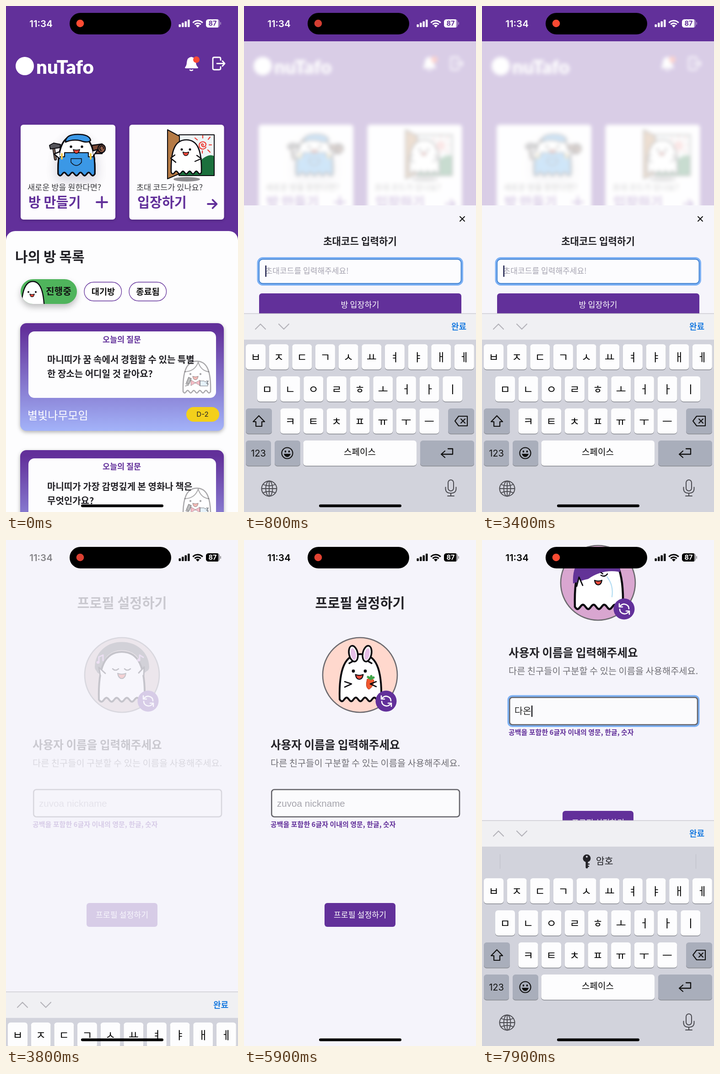
Animation, 507 px wide and 1104 px high, one loop 8000 ms. Source, as an HTML page with a canvas:

```html
<!DOCTYPE html>
<html lang="ko">
<head>
<meta charset="utf-8">
<title>Room app</title>
<style>
html, body { margin: 0; width: 507px; height: 1104px; overflow: hidden; background: #f5f4fb; }
canvas { display: block; width: 507px; height: 1104px; }
</style>
</head>
<body>
<canvas id="stage"></canvas>
<script>
const W = 507, H = 1104, LOOP = 8000;
const PURPLE = '#62309a', PAPER = '#f5f4fb', INK = '#232227', LINE = '#0c0b10';
const KR = '"Noto Sans CJK KR", "Noto Sans CJK", sans-serif';
const UI = 'Inter, sans-serif';

let c;
const stage = document.getElementById('stage');

function makeContext(canvas, scale) {
  canvas.width = W * scale;
  canvas.height = H * scale;
  const ctx = canvas.getContext('2d');
  ctx.scale(scale, scale);
  ctx.lineCap = ctx.lineJoin = 'round';
  return ctx;
}

// ---------- helpers ----------
const clamp = v => Math.max(0, Math.min(1, v));
const lerp = (a, b, k) => a + (b - a) * k;
const ramp = (t, start, dur) => clamp((t - start) / dur);
const easeOut = k => 1 - (1 - k) ** 3;

function paint(p, fill, stroke, w = 2) {
  if (fill) { c.fillStyle = fill; c.fill(p); }
  if (stroke) { c.strokeStyle = stroke; c.lineWidth = w; c.stroke(p); }
}
const path = (d, fill, stroke, w) => paint(new Path2D(d), fill, stroke, w);
function box(x0, y0, x1, y1, r, fill, stroke, w) {
  const p = new Path2D();
  p.roundRect(x0, y0, x1 - x0, y1 - y0, r);
  paint(p, fill, stroke, w);
  return p;
}
function oval(x, y, rx, ry, fill, stroke, w, turn = 0) {
  const p = new Path2D();
  p.ellipse(x, y, rx, ry, turn, 0, 7);
  paint(p, fill, stroke, w);
  return p;
}
function text(s, x, cy, size, color, weight = 400, align = 'left', font = KR) {
  c.font = `${weight} ${size}px ${font}`;
  c.textAlign = align;
  c.fillStyle = color;
  c.fillText(s, x, cy + size * 0.36);
}
function group(draw, { dx = 0, dy = 0, alpha = 1, clip } = {}) {
  c.save();
  c.translate(dx, dy);
  c.globalAlpha *= alpha;
  if (clip) c.clip(clip);
  draw();
  c.restore();
}
function withShadow(color, blur, dy, draw) {
  c.save();
  c.shadowColor = color;
  c.shadowBlur = blur;
  c.shadowOffsetY = dy;
  draw();
  c.restore();
}

// ---------- ghosts ----------
function ghost(x, y, w, h, lw) {
  const p = new Path2D(), base = y + h * 0.95, mid = x + w / 2;
  p.moveTo(x, base);
  p.bezierCurveTo(x - w * 0.02, y + h * 0.3, x + w * 0.13, y, mid, y);
  p.bezierCurveTo(x + w * 0.87, y, x + w * 1.02, y + h * 0.3, x + w, base);
  for (let i = 0; i <= 48; i++) {
    const u = i / 48;
    p.lineTo(x + w * (1 - u), base + h * 0.04 * Math.sin(u * Math.PI * 9));
  }
  p.closePath();
  paint(p, '#fff', LINE, lw);
  return p;
}
function mouth(x, y, w, lw = 2) {
  path(`M${x - w / 2} ${y} Q${x} ${y + w * 0.2} ${x + w / 2} ${y} Q${x + w * 0.4} ${y + w * 0.62} ${x} ${y + w * 0.62} Q${x - w * 0.4} ${y + w * 0.62} ${x - w / 2} ${y}Z`, '#ee4b3c', LINE, lw);
}
function face(x, y, gap, r, mw) {
  oval(x - gap, y, r, r, LINE);
  oval(x + gap, y, r, r, LINE);
  mouth(x, y + r * 2.2, mw, r * 0.6);
}

function builder() {
  withShadow('rgba(60,50,80,.22)', 26, 10, () => ghost(114, 282, 80, 89, 3));
  path('M188 304L210 301V322H190Z', '#7a4a38', LINE, 2.5);
  oval(209, 311, 8, 9, '#8d5a45', LINE, 2.5);
  path('M213 311a4 5 0 1 0 -5 4', null, LINE, 2);
  const body = ghost(114, 282, 80, 89, 3);
  group(() => {
    path('M112 329H128V320H180V329H198V380H112Z', '#3b98e6', LINE, 2);
    path('M142 333H165V341Q154 355 142 341Z', null, LINE, 1.5);
  }, { clip: body });
  paint(body, null, LINE, 3);
  path('M122 323v10M185 323v10', null, '#f3c74a', 4);
  path('M130 297Q130 280 157 280Q182 280 185 293Q179 300 163 294Q146 290 130 297Z', '#3b98e6', LINE, 2.5);
  path('M104 309L108 334', null, LINE, 6);
  path('M104 309L108 334', null, '#81685c', 3);
  path('M95 304L104 299L119 302L118 309L97 312Z', '#55545a', LINE, 2);
  path('M117 318L105 323L117 333', '#fff', LINE, 2.5);
  path('M190 316L201 313L191 327', '#fff', LINE, 2.5);
  face(154, 307, 12, 2.7, 14);
}

function visitor() {
  oval(395, 378, 29, 5, '#8e8d90');
  box(378, 281, 455, 370, 0, '#eef4f6', LINE, 2);
  path('M379 340Q414 350 430 333Q444 322 454 327V369H379Z', '#1b703d');
  path('M431 304a2 2 0 1 0 -4 -2a5 5 0 1 0 9 -3a8 8 0 1 0 1 9M418 292l-5-4M430 288v-5M442 291l4-5M444 303h5M441 314l5 5M429 316v5', null, '#ee3c35', 2.2);
  path('M353 270L379 284V366L353 377Z', '#b57a45', LINE, 2);
  ghost(361, 292, 66, 75, 2.6);
  path('M371 341L360 332L369 325', '#fff', LINE, 2.3);
  path('M413 339L427 333L417 326', '#fff', LINE, 2.3);
  face(393, 313, 9, 2.5, 13);
}

function messenger() {
  ghost(387, 775, 60, 70, 2.5);
  path('M391 798Q413 797 420 777Q426 796 443 798', null, LINE, 2);
  face(414, 803, 11, 2.2, 12);
  path('M414 822L404 816V828ZL424 816V828Z', '#e6455e', LINE, 1);
  path('M399 810l6 3l-5 12l-6-3Z', '#444', LINE, 1.5);
  path('M424 818h9q2 4 5 0h3v11h-17Z', '#b9dcf2', LINE, 1.5);
  path('M393 824l6 3l-7 2M442 818l-4 5l4 2', null, LINE, 2);
}

const avatars = {
  music: {
    color: '#c8b3b0',
    draw() {
      path('M203 278C204 216 302 216 304 278', null, '#4b4a50', 18);
      oval(207, 276, 10, 16, '#4b4a50', null, 0, 0.2);
      oval(299, 274, 10, 16, '#4b4a50', null, 0, -0.2);
      ghost(203, 244, 100, 110, 4);
      path('M206 296L203 278L217 291', '#fff', LINE, 3);
      path('M290 290L302 277L301 296', '#fff', LINE, 3);
      path('M233 281q6 6 13 0M259 281q6 6 13 0', null, LINE, 2.5);
      mouth(253, 291, 18, 2);
      path('M203 267V255l9-4v12M292 262V251l8 5', null, '#c48fd0', 3);
      oval(201, 267, 3.5, 3, '#c48fd0');
      oval(290, 262, 3.5, 3, '#c48fd0');
    }
  },
  rabbit: {
    color: '#ffd8cd',
    draw() {
      ghost(209, 249, 91, 104, 4);
      for (const side of [-1, 1]) {
        oval(254 + side * 15, 248, 9.5, 17.5, '#fff', LINE, 3.5, side * 0.2);
        oval(254 + side * 15, 249, 5.5, 13, '#e6bfe8', null, 0, side * 0.2);
      }
      path('M230 269L237 265M272 265L279 269', null, LINE, 3.5);
      face(252, 286, 13, 3.4, 17);
      path('M220 309L235 314L220 321', null, LINE, 2.5);
      path('M269 304Q277 299 284 306Q284 319 273 326Q264 322 269 304Z', '#f0572e', '#b23a1c', 1);
      path('M277 303l-6-4M277 303l1-6M277 303l6-3', null, '#3fa548', 5);
      path('M289 309L276 314L289 320', null, LINE, 2.5);
    }
  },
  beret: {
    color: '#d9a6d0',
    draw() {
      ghost(203, 231, 105, 122, 4.5);
      path('M199 296Q197 262 214 244Q228 225 253 224Q299 224 302 268Q302 272 297 270Q262 265 232 286Q214 290 199 296Z', '#633397');
      path('M207 302L212 282L220 300', '#fff', LINE, 2.8);
      path('M260 278q8 5 14 -3M264 275l-4 -3', null, LINE, 2.5);
      mouth(254, 289, 16, 2.2);
      path('M273 281Q288 300 284 325', null, '#b3dcf2', 2.2);
    }
  }
};

// ---------- system chrome ----------
function statusBar(t, color, digits, timeAlpha) {
  group(() => text('11:34', 76.5, 38.5, 20.5, color, 600, 'center', UI), { alpha: timeAlpha });
  box(139, 15, 361, 62, 23.5, '#000');
  const k = 0.5 + 0.5 * Math.cos(t / 1600 * 2 * Math.PI);
  oval(162, 38, 8.3, 8.3, `rgb(${lerp(212, 255, k)},${lerp(62, 75, k)},50)`);
  for (let i = 0; i < 4; i++) box(377.5 + i * 6.5, 40 - i * 3.4, 382 + i * 6.5, 46, 1.2, color);
  c.save();
  c.lineCap = 'butt';
  for (const r of [14.5, 9]) {
    c.beginPath();
    c.arc(419, 46.5, r, -Math.PI * 0.76, -Math.PI * 0.24);
    c.strokeStyle = color;
    c.lineWidth = 3.2;
    c.stroke();
  }
  c.restore();
  path('M419 47L414.8 42.5Q419 39.5 423.2 42.5Z', color);
  const shell = new Path2D();
  shell.roundRect(437, 29, 30, 18, 5.5);
  group(() => paint(shell, color), { alpha: 0.4 });
  group(() => box(437, 29, 463.5, 47, 0, color), { clip: shell });
  group(() => box(468, 35, 470, 41, 1, color), { alpha: 0.4 });
  text('87', 451.5, 38.2, 14.5, digits, 700, 'center', UI);
}
const homeBar = () => box(164, 1087.5, 344, 1093.5, 3, '#000');

function key(x, y, w, label, dark) {
  box(x, y + 1.5, x + w, y + 56.5, 6, '#898b92');
  box(x, y, x + w, y + 55, 6, dark ? '#a9aebb' : '#fdfdfe');
  if (label) text(label, x + w / 2, y + 28, 24, '#000', 400, 'center');
}
const keyRow = (s, x, y) => [...s].forEach((ch, i) => key(x + i * 50.65, y, 43, ch));

function keyboard(dy, predict) {
  group(() => {
    const top = predict ? 612 : 671;
    box(0, top, W, H, 0, '#f0f0f3');
    box(0, top - 0.5, W, top + 0.8, 0, '#c6c5cb');
    path(`M25 ${top + 34}l11-11l11 11M76 ${top + 23}l11 11l11-11`, null, '#b5b4ba', 2.2);
    text('완료', 469.5, top + 28.5, 18, '#1c7ce0', 700, 'center');
    box(0, top + 57, W, H, 0, '#d2d3dc');
    if (predict) {
      path('M39.5 686V717M467.5 686V717', null, '#bcbdc6', 1);
      path('M229 699V714', null, INK, 5);
      path('M230 707h4M230 712h3', null, INK, 2.5);
      oval(229, 694.5, 8.5, 8.5, INK);
      oval(229, 691, 2, 2, '#d2d3dc');
      text('암호', 249, 701, 20.5, '#1b1b1f');
    }
    keyRow('ㅂㅈㄷㄱㅅㅛㅕㅑㅐㅔ', 4, 738);
    keyRow('ㅁㄴㅇㄹㅎㅗㅓㅏㅣ', 29, 808);
    keyRow('ㅋㅌㅊㅍㅠㅜㅡ', 79.5, 878);
    key(4, 878, 57, '', true);
    path('M32.5 894L45 907H39V917H26V907H20Z', null, '#111', 2.2);
    key(446, 878, 57, '', true);
    path('M461 905.5L469 895H488V916H469ZM474 901l9 9M483 901l-9 9', null, '#111', 2.1);
    key(4, 948, 55, '', true);
    text('123', 31.5, 976, 20, '#111', 400, 'center', UI);
    key(67, 948, 56, '', true);
    oval(94.5, 975.5, 12, 12, null, '#111', 2.2);
    oval(90.5, 972, 1.8, 2.2, '#111');
    oval(98.5, 972, 1.8, 2.2, '#111');
    path('M87 977H102Q100 984 94.5 984Q89 984 87 977Z', '#111');
    key(129.5, 948, 247.5);
    text('스페이스', 253, 973, 19, '#000', 400, 'center');
    key(385, 948, 118, '', true);
    path('M439 971L431 978L439 985M432 978H456V966H446', null, '#111', 2.3);
    const grey = '#4a4a50';
    oval(55, 1053, 16.5, 16.5, null, grey, 2);
    oval(55, 1053, 7.5, 16.5, null, grey, 1.8);
    path('M55 1037V1069M39 1053H71M42 1044Q55 1050 68 1044M42 1062Q55 1056 68 1062', null, grey, 1.8);
    box(446, 1034, 458, 1058, 6, null, grey, 2);
    path('M440.5 1050V1054Q441 1063 452 1063Q463 1063 463.5 1054V1050M452 1063V1069M445 1069H459', null, grey, 2);
  }, { dy });
}

// ---------- home ----------
function homeCard(x, draw, small, tx, big, bx) {
  withShadow('rgba(0,0,0,.2)', 6, 2, () => box(x, 259, x + 207, 466, 6, '#fdfcfe'));
  draw();
  text(small, tx, 395.5, 17.5, '#3a3a3e');
  text(big, bx, 428.5, 29.3, PURPLE, 600);
}

function question(dy, a, b) {
  group(() => {
    const g = c.createLinearGradient(0, 692, 0, 927);
    g.addColorStop(0.05, PURPLE);
    g.addColorStop(1, '#a3b3f9');
    withShadow('rgba(0,0,0,.3)', 8, 3, () => box(31, 692, 476, 927, 14, g));
    box(49, 710, 459, 855, 13, '#fdfdfe');
    text('오늘의 질문', 253, 728, 17.4, PURPLE, 600, 'center');
    group(messenger, { alpha: 0.35 });
    text(a, 90, 772, 20, INK, 600);
    text(b, 90, 803, 20, INK, 600);
    text('별빛나무모임', 47, 893, 24, '#fff');
    box(394, 875, 466, 907, 16, '#f3d01b');
    text('D-2', 429.5, 891, 15, INK, 400, 'center', UI);
  }, { dy });
}

function home() {
  box(0, 0, W, H, 0, PURPLE);
  oval(41, 131, 20, 20, '#fff');
  text('nuTafo', 66, 133, 42, '#fff', 900, 'left', 'Lato, sans-serif');
  path('M391 134Q395 130 395 123Q396 112 405 111Q414 112 415 123Q415 130 420 134Q420 136 418 136H393Q391 136 391 134Z', '#fff');
  path('M402 139.5Q405 142 408 139.5', null, '#fff', 2.5);
  oval(416, 117, 7, 7, '#fb4a35');
  path('M469 118V115Q469 112 466 112H455Q452 112 452 115V136Q452 139 455 139H466Q469 139 469 136V133M461 125.5H478M473 120L478 125.5L473 131', null, '#fff', 2.8);

  homeCard(32, builder, '새로운 방을 원한다면?', 47, '방 만들기', 49);
  path('M198 428H221M209.5 416.5V439.5', null, PURPLE, 4);
  homeCard(269.5, visitor, '초대 코드가 있나요?', 285, '입장하기', 287);
  path('M441 432H460M451.5 423L460.5 432L451.5 441', null, PURPLE, 3.8);

  box(0, 491, W, H + 30, 20, '#fdfdfe');
  text('나의 방 목록', 20, 547.5, 30, INK, 600);
  let pill;
  withShadow('rgba(0,0,0,.25)', 14, 7, () => { pill = box(32, 596, 155, 650, 27, '#4fb45c'); });
  group(() => {
    ghost(33, 601, 51, 90, 2.4);
    face(57, 624, 8, 2, 10);
  }, { clip: pill });
  text('진행중', 87, 623, 20.2, '#111', 700);
  box(171, 602.5, 252.5, 643.5, 20.5, '#fff', PURPLE, 1.3);
  text('대기방', 212.5, 623, 18.6, '#111', 700, 'center');
  box(269, 602.5, 350.5, 643.5, 20.5, '#fff', PURPLE, 1.3);
  text('종료됨', 310, 623, 18.6, '#111', 700, 'center');
  question(0, '마니띠가 꿈 속에서 경험할 수 있는 특별', '한 장소는 어디일 것 같아요?');
  question(277, '마니띠가 가장 감명깊게 본 영화나 책은', '무엇인가요?');
}

// ---------- invite sheet ----------
function inviteSheet(y, t) {
  group(() => {
    box(0, 435, W, H + 20, 0, '#f6f5fb');
    path('M472 459.5L482 469.5M482 459.5L472 469.5', null, '#111', 2);
    text('초대코드 입력하기', 253.5, 513, 21.2, INK, 700, 'center');
    box(31, 550.5, 476.5, 607.5, 10, null, '#7db1f4', 5);
    box(33, 552.5, 474.5, 605.5, 8, '#fcfcfe', '#3d7fd0', 1.8);
    text('초대코드를 입력해주세요!', 46.5, 578, 17.1, '#a5a3b0');
    box(46.5, 566, 49, 591, 1, '#1a1c4a');
    box(33, 627, 475, 679, 6, PURPLE);
    text('방 입장하기', 253.5, 652, 17.4, '#fff', 400, 'center');
    const menu = Math.min(ramp(t, 2200, 120), 1 - ramp(t, 2900, 120));
    if (menu > 0) group(editMenu, { alpha: menu });
  }, { dy: y - 435 });
}
function editMenu() {
  withShadow('rgba(0,0,0,.25)', 28, 6, () =>
    path('M31 497H232Q242 497 242 507V538Q242 548 232 548H65L57 556Q55 558 53 556L45 548H31Q21 548 21 538V507Q21 497 31 497Z', '#f9f8fc'));
  path('M129.5 497V548', null, '#dcdbe1', 1);
  text('붙여넣기', 74.5, 522, 18.2, '#111', 400, 'center');
  text('자동 완성', 185, 522, 18.2, '#111', 400, 'center');
}

const blurred = document.createElement('canvas');
function cacheBlur() {
  const sharp = document.createElement('canvas');
  c = makeContext(sharp, 1);
  home();
  const b = makeContext(blurred, 1);
  b.filter = 'blur(4.5px)';
  b.drawImage(sharp, 0, 0);
}

function homeScene(t) {
  home();
  const k = easeOut(ramp(t, 150, 400));
  if (k > 0) {
    const below = new Path2D();
    below.rect(0, 77, W, H);
    group(() => {
      c.drawImage(blurred, 0, 0, W, H);
      box(0, 77, W, H, 0, 'rgba(255,255,255,.755)');
    }, { alpha: k, clip: below });
    inviteSheet(lerp(H, 435, k), t);
  }
}

// ---------- profile ----------
const typing = ['', 'ㄷ', '다', '당', '다오', '다온'];

function profile(t, scroll) {
  const focused = t >= 6600;
  const avatar = t < 5100 ? avatars.music : t < 6200 ? avatars.rabbit : avatars.beret;
  box(0, 0, W, H, 0, PAPER);
  group(() => {
    text('프로필 설정하기', 253.5, 137.5, 29.4, INK, 600, 'center');
    const disc = oval(253.5, 294.5, 81.5, 81.5, avatar.color);
    group(avatar.draw, { clip: disc });
    paint(disc, null, '#6c6a6f', 2.6);
    oval(310.5, 351.5, 23, 23, PURPLE);
    path('M300 340V347H307M301 346Q306 340 312 341Q321 343 321 351M322 363V356H315M321 357Q316 363 310 362Q301 360 301 352', null, '#fff', 2.6);
    text('사용자 이름을 입력해주세요', 58, 447, 24.6, INK, 600);
    text('다른 친구들이 구분할 수 있는 이름을 사용해주세요.', 58, 486.5, 19.8, '#706f75');
    if (focused) box(58, 542, 473, 606.5, 8, null, '#7db1f4', 5);
    box(60.3, 544.5, 471, 604, 6, '#fbfbfd', '#66656b', 2.6);
    const typed = typing[Math.min(5, Math.max(0, Math.floor((t - 7300) / 120) + 1))];
    let caret = 72;
    if (typed) {
      text(typed, 71, 574, 19.8, '#222');
      caret = 71.5 + c.measureText(typed).width;
    } else {
      text('zuvoa nickname', 72, 575, 20.6, '#a5a4ac', 400, 'left', '"Liberation Sans", sans-serif');
    }
    if (focused) box(caret, 562, caret + 2.4, 587, 1, '#17171c');
    text('공백을 포함한 6글자 이내의 영문, 한글, 숫자', 58, 620.5, 15, PURPLE, 700);
    box(176, 792, 331, 844, 6, PURPLE);
    text('프로필 설정하기', 253.5, 818, 17.3, '#fff', 400, 'center');
  }, { dy: -scroll });
  const veil = 1 - ramp(t, 3700, 500);
  if (veil > 0) group(() => box(0, 0, W, H, 0, PAPER), { alpha: veil });
}

// ---------- timeline ----------
function draw(t) {
  const onProfile = t >= 3700;
  const rise = easeOut(ramp(t, 6600, 418));
  const scroll = easeOut(ramp(t, 6600, 447));
  const up = easeOut(ramp(t, 300, 400));
  const down = easeOut(ramp(t, 3650, 430));
  if (onProfile) profile(t, 201 * scroll);
  else homeScene(t);
  if (rise > 0) keyboard(492 * (1 - rise), true);
  else if (up > 0 && down < 1) keyboard(433 * (1 - up + down), false);
  if (onProfile) statusBar(t, '#000', '#fff', ramp(t, 3700, 220));
  else statusBar(t, '#fff', PURPLE, 1);
  homeBar();
}

cacheBlur();
c = makeContext(stage, window.devicePixelRatio || 1);
function tick() {
  draw(performance.now() % LOOP);
  requestAnimationFrame(tick);
}
tick();
</script>
</body>
</html>
```
